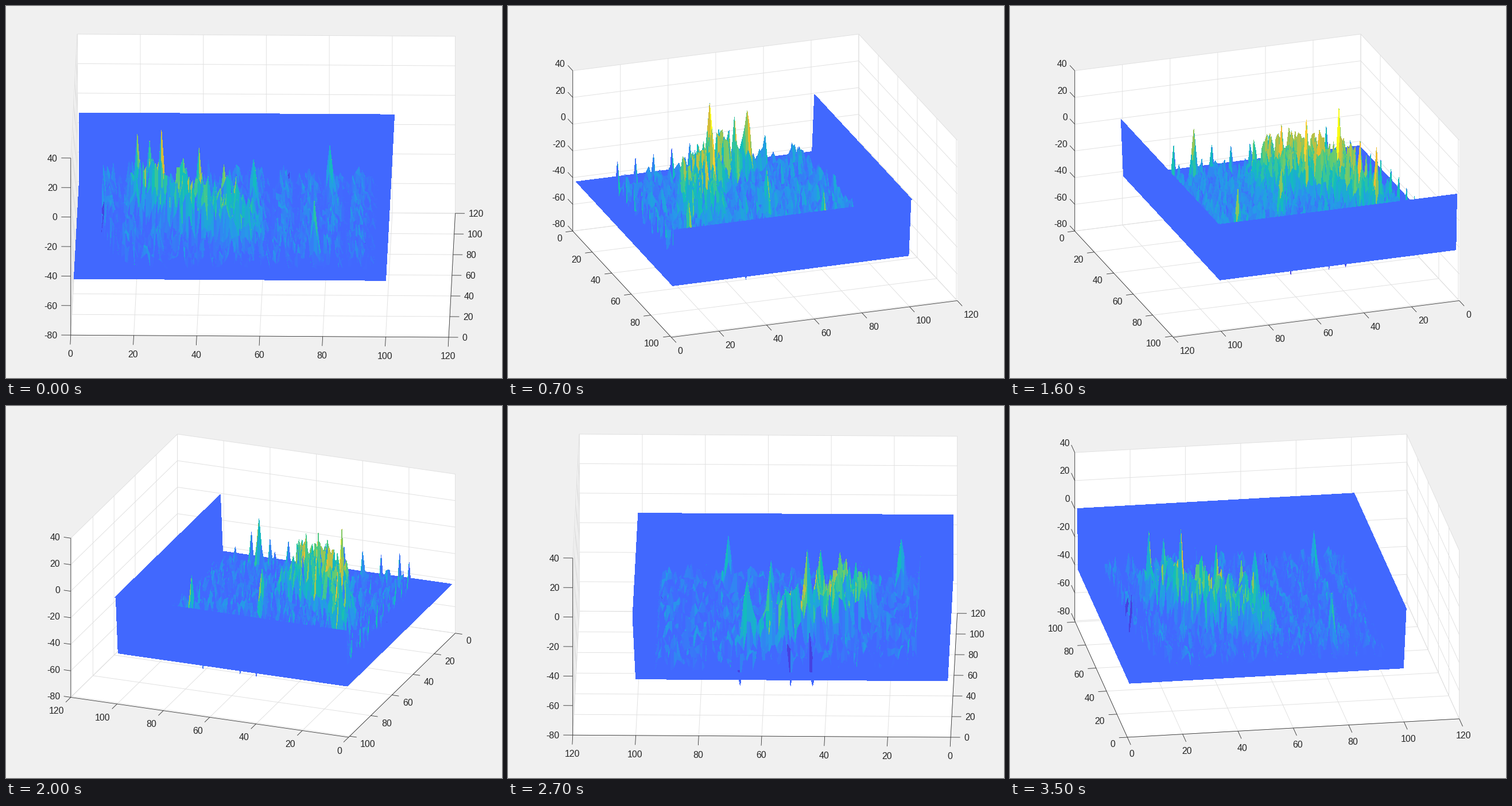
These frames come from a looping animation (864 px wide and 648 px high, 3600 ms). A matplotlib script:

```python
import numpy as np
import matplotlib.pyplot as plt
from matplotlib.animation import FuncAnimation
from matplotlib.collections import LineCollection, PolyCollection
from matplotlib.colors import LinearSegmentedColormap

W, H, DPI = 864, 648, 72
LEFT, RIGHT, TOP, BOTTOM = 112.8, 782.6, 49, 577
EL = np.radians(35)
FRAMES, STEP = 36, 10
ZMIN, ZMAX = -80, 40
BASE, LOW, HIGH = -42.5, -60.5, 27
DARK, GRID = "#262626", "#dfdfdf"

PARULA = LinearSegmentedColormap.from_list("parula", [
    (0, "#3e26a8"), (.11, "#4747eb"), (.206, "#4169fe"), (.35, "#259be8"),
    (.5, "#12beb9"), (.63, "#5ccc76"), (.79, "#e6bb2d"), (.87, "#fec338"),
    (1, "#f9fb15")])

PEAKS = [(28, 46, 27), (20, 65, 11), (24, 58, 11), (40, 42, 18), (48, 36, 11),
         (35, 43, 10), (57, 58, -1), (81, 72, -1), (77, 17, 0)]


def make_surface():
    rng = np.random.default_rng(11)
    x, y = np.meshgrid(np.arange(1, 102), np.arange(1, 102))
    left = np.round(9 + 5 * np.clip((50 - y) / 40, 0, 1)).astype(int)

    # striped noise floor
    noise = rng.normal(size=x.shape)
    noise = (noise + .7 * np.roll(noise, 1, axis=0)) / 1.22
    z = BASE + 2 + 4 * np.sin(2 * np.pi * x / 8) + 5 * noise

    # steep curved ridge
    t = x - 20
    crest = 60 - 1.75 * t + .028 * t**2
    ridge = np.exp(-((y - crest) / 8) ** 4 - ((x - 38) / 20) ** 8)
    z += ridge * (12 + 32 * rng.random(x.shape))
    z = np.clip(z, -57, 4)

    for px, py, top in PEAKS:
        wx, wy = rng.uniform(1, 1.6), rng.uniform(1.3, 2.2)
        bump = np.exp(-((x - px) / wx) ** 2 - ((y - py) / wy) ** 2)
        z = np.maximum(z, BASE + (top - BASE) * bump)
    z = np.where((x >= left) & (x <= 95) & (y >= 11) & (y <= 93), z, BASE)

    # a spike every eight cells along two edges, a few pits along the others
    for k in range(19, 85, 8):
        z[10, k - 1] = BASE + rng.uniform(20, 28)
    for k in range(13, 85, 8):
        z[k - 1, left[k - 1, 0] - 1] = BASE + rng.uniform(22, 26)
    for k in rng.integers(30, 75, 3):
        z[91, k] = z[k, 8] = BASE - 9.5
    z[34, 91] = BASE - 9.5
    z[-1, :] = z[:, -1] = 0
    return x, y, z


X, Y, Z = make_surface()
COLORS = PARULA((Z[:-1, :-1].ravel() - LOW) / (HIGH - LOW))


def axis_limits(deg):
    """The foreshortened axis is tight at shallow angles."""
    fold = min(deg % 90, 90 - deg % 90)
    lims = [120, 120]
    if 5 < fold < 25:
        a = np.radians(deg)
        lims[1 if abs(np.cos(a)) > abs(np.sin(a)) else 0] = 101
    return lims


def make_projection(deg, lims):
    a = np.radians(deg)
    c, s = np.cos(a), np.sin(a)

    def raw(x, y, z):
        x, y = x / lims[0], y / lims[1]
        z = (z - ZMIN) / (ZMAX - ZMIN)
        return x * c + y * s, z * np.cos(EL) + np.sin(EL) * (y * c - x * s)

    box = [raw(x, y, z) for x in (0, lims[0]) for y in (0, lims[1]) for z in (ZMIN, ZMAX)]
    (u0, v0), (u1, v1) = np.min(box, axis=0), np.max(box, axis=0)

    def project(x, y, z):
        u, v = raw(x, y, z)
        px = LEFT + (u - u0) / (u1 - u0) * (RIGHT - LEFT)
        py = BOTTOM - (v - v0) / (v1 - v0) * (BOTTOM - TOP)
        return np.stack(np.broadcast_arrays(px, py), axis=-1)

    return project


def unit(v):
    return v / np.hypot(*v)


def label(x, y, value, ha):
    ax.text(x, y + 5.8, f"{value:d}", ha=ha, va="baseline", color=DARK,
            fontsize=16, family="Liberation Sans")


def floor_label(end, d, value):
    dx, dy = d
    y = end[1] + (10 + 6 * dy if dy > .03 else 0)
    if abs(dx) > .5:
        gap = min(6.5, 12 * (abs(dx) - .45))
        label(end[0] + np.sign(dx) * gap, y, value, "left" if dx > 0 else "right")
    else:
        label(end[0] + 4 * dx, y, value, "center")


def draw_box(project, lims, front, back):
    """White walls and grid; returns the ticks of each axis."""
    (xb, yb), (lx, ly) = back, lims
    faces = [
        [(0, 0, ZMIN), (lx, 0, ZMIN), (lx, ly, ZMIN), (0, ly, ZMIN)],
        [(xb, 0, ZMIN), (xb, ly, ZMIN), (xb, ly, ZMAX), (xb, 0, ZMAX)],
        [(0, yb, ZMIN), (lx, yb, ZMIN), (lx, yb, ZMAX), (0, yb, ZMAX)]]
    ax.add_collection(PolyCollection([[project(*p) for p in f] for f in faces],
                                     facecolor="white", edgecolor="none", zorder=1))
    ticks = [range(0, lx + 1, 20), range(0, ly + 1, 20), range(ZMIN, ZMAX + 1, 20)]
    paths = [[(t, front[1], ZMIN), (t, yb, ZMIN), (t, yb, ZMAX)] for t in ticks[0]]
    paths += [[(front[0], t, ZMIN), (xb, t, ZMIN), (xb, t, ZMAX)] for t in ticks[1]]
    paths += [[(front[0], yb, t), (xb, yb, t), (xb, front[1], t)] for t in ticks[2]]
    ax.add_collection(LineCollection([[project(*p) for p in path] for path in paths],
                                     colors=GRID, linewidths=.9, zorder=2))
    return ticks


def draw_surface(project, deg, lims):
    p = project(X, Y, Z)
    quads = np.stack([p[:-1, :-1], p[:-1, 1:], p[1:, 1:], p[1:, :-1]], axis=2)
    a = np.radians(deg)
    near = X / lims[0] * np.sin(a) - Y / lims[1] * np.cos(a)
    order = np.argsort(near[:-1, :-1].ravel(), kind="stable")
    # no antialiasing, so neighbouring faces leave no seams
    ax.add_collection(PolyCollection(quads.reshape(-1, 4, 2)[order],
                                     facecolors=COLORS[order], edgecolors="none",
                                     antialiaseds=False, zorder=3))


def draw_axes(project, ticks, front, back):
    corners = [(back[0], front[1]), (front[0], back[1])]
    corners.sort(key=lambda c: project(*c, ZMIN)[0])
    left, right = corners
    pl, pf, pr = (project(*c, ZMIN) for c in (left, front, right))
    pt = project(*left, ZMAX)
    size = .025 * max(np.hypot(*(pf - pl)), np.hypot(*(pr - pf)), pl[1] - pt[1])
    lines = [[pt, pl, pf, pr]]

    for corner, d in ((left, unit(pf - pr)), (right, unit(pf - pl))):
        k = 0 if corner[0] != front[0] else 1
        for t in ticks[k]:
            pos = (t, front[1]) if k == 0 else (front[0], t)
            start = project(*pos, ZMIN)
            lines.append([start, start + size * d])
            floor_label(start + size * d, d, t)

    d = unit(pl - pf)
    for t in ticks[2]:
        start = project(*left, t)
        end = start + size * d
        lines.append([start, end])
        label(end[0] + 6.6 * d[0], end[1] + 4.5 * d[1], t, "right")
    ax.add_collection(LineCollection(lines, colors=DARK, linewidths=.8, zorder=4))


def update(frame):
    ax.clear()
    ax.set(xlim=(0, W), ylim=(H, 0))
    ax.axis("off")
    deg = 1 + STEP * frame
    a = np.radians(deg)
    lims = axis_limits(deg)
    front = (lims[0] if np.sin(a) > 0 else 0, lims[1] if np.cos(a) < 0 else 0)
    back = (lims[0] - front[0], lims[1] - front[1])
    project = make_projection(deg, lims)
    ticks = draw_box(project, lims, front, back)
    draw_surface(project, deg, lims)
    draw_axes(project, ticks, front, back)
    return []


fig = plt.figure(figsize=(W / DPI, H / DPI), dpi=DPI, facecolor="#f0f0f0")
ax = fig.add_axes([0, 0, 1, 1])
anim = FuncAnimation(fig, update, frames=FRAMES, init_func=lambda: [],
                     interval=100, repeat=True, repeat_delay=0)
plt.show()
```
